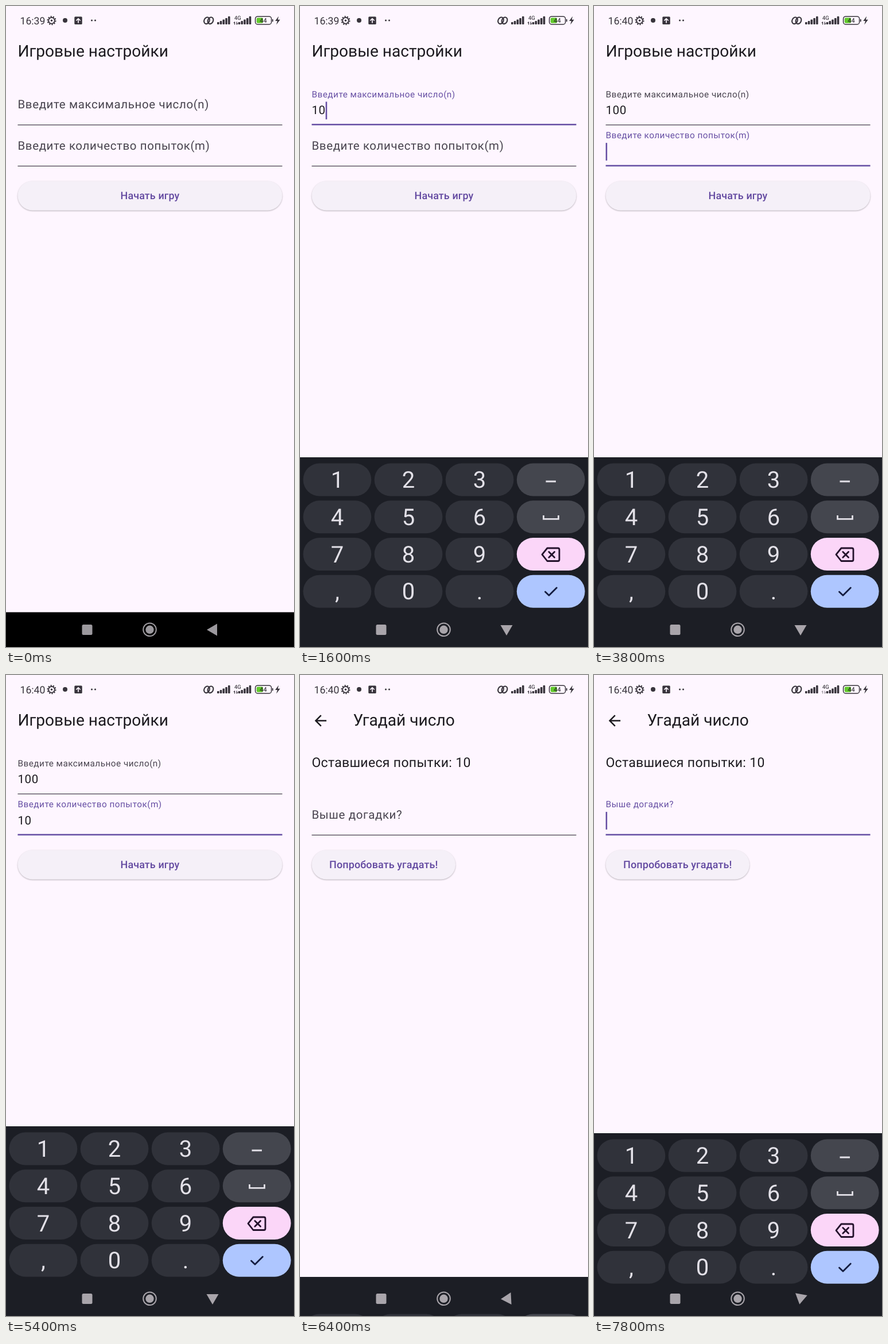
An HTML page for the animation above (8 s loop, 502 px wide and 1115 px high).

```html
<!DOCTYPE html>
<html lang="ru">
<head>
<meta charset="utf-8">
<title>Угадай число</title>
<style>
  html, body { margin: 0; width: 100%; height: 100%; overflow: hidden; background: #fef6ff; }
  svg { display: block; width: 502px; height: 1115px; }
  text { font-family: Roboto, "Noto Sans", sans-serif; fill: #1d1b20; text-rendering: geometricPrecision; white-space: pre; }
  .title { font-size: 28.1px; }
  .info { font-size: 23px; letter-spacing: .32px; }
  .label, .value { font-size: 20.45px; letter-spacing: .64px; }
  .label { fill: #49454f; }
  .line { fill: #49454f; }
  .focus .label, .focus .line, .caret { fill: #6750a4; }
  .button rect { fill: #f5f0f8; filter: drop-shadow(0 1.3px 1px rgba(0, 0, 0, .28)); }
  .button.pressed rect { fill: #e9e0f3; }
  .button text { fill: #6248a0; font-size: 17.9px; font-weight: 500; letter-spacing: .13px; text-anchor: middle; }
  .clock { font-size: 17.6px; fill: #38343c; }
  .digit { font-size: 40px; fill: #e3e1e8; text-anchor: middle; }
  .stroke { fill: none; stroke-linecap: round; stroke-linejoin: round; }
</style>
</head>
<body>
<svg id="stage" viewBox="0 0 502 1115" xmlns="http://www.w3.org/2000/svg"></svg>
<script>
const LOOP = 8000;
const LEFT = 20.45;
const DIGIT_WIDTH = 12.1;
const ROW = 71.6;
const INK = '#38343c';

const rect = (x, y, w, h, fill, r = 0, extra = '') =>
  `<rect x="${x}" y="${y}" width="${w}" height="${h}" rx="${r}" fill="${fill}" ${extra}/>`;
const label = (cls, x, y, s) => `<text class="${cls}" x="${x}" y="${y}">${s}</text>`;
const path = (d, color, width) =>
  `<path class="stroke" d="${d}" stroke="${color}" stroke-width="${width}"/>`;

function field(id, y, caption) {
  return `<g id="${id}" transform="translate(0 ${y})">
    <text class="label">${caption}</text>
    <text class="value" x="${LEFT}" y="188.3"></text>
    <rect class="line" x="${LEFT}" width="461.1"/>
    <rect class="caret" y="166.5" width="2.56" height="30.7"/>
  </g>`;
}

function button(id, width, caption) {
  return `<g id="${id}" class="button">
    <rect x="${LEFT}" y="304.5" width="${width}" height="51" rx="25.5"/>
    ${label('', LEFT + width / 2, 336.3, caption)}
  </g>`;
}

function signal(x) {
  return [4, 6, 8.5, 11, 14].map((h, i) => rect(x + i * 4.75, 32 - h, 3.6, h, INK, 1)).join('');
}

function statusBar() {
  return `<text id="clock" class="clock" x="24.5" y="31.7"></text>
    <circle cx="79.5" cy="25.3" r="5.3" fill="none" stroke="${INK}" stroke-width="1.8"/>
    <circle cx="79.5" cy="25.3" r="7" fill="none" stroke="${INK}" stroke-width="2" stroke-dasharray="2.2 2.2"/>
    <circle cx="79.5" cy="25.3" r="1.7" fill="${INK}"/>
    <circle cx="103" cy="25" r="4" fill="${INK}"/>
    ${rect(119.3, 18.5, 13.4, 13.4, INK, 1.5)}
    ${path('M126 29V22M122.8 25L126 21.8L129.2 25', '#fef6ff', 1.7)}
    <circle cx="149.5" cy="25" r="1.5" fill="${INK}"/><circle cx="155.5" cy="25" r="1.5" fill="${INK}"/>
    <g fill="none" stroke="${INK}" stroke-width="2.1">
      <ellipse cx="350" cy="25.3" rx="4.6" ry="6" transform="rotate(25 350 25.3)"/>
      <ellipse cx="356.5" cy="25.3" rx="4.6" ry="6" transform="rotate(25 356.5 25.3)"/>
    </g>
    ${signal(368)}
    <text x="398" y="24.3" font-size="9.5">4G</text>
    <g id="traffic">${path('M398.6 32V27.8L397.2 29.2M402.2 27.8V32L403.6 30.6', INK, 1.2)}</g>
    ${signal(404.7)}
    ${rect(434.6, 18.2, 28, 13.8, 'none', 4, `stroke="${INK}" stroke-width="1.5"`)}
    ${rect(436.8, 20.4, 11.2, 9.4, '#62c92c', 2)}
    ${rect(463.9, 22.8, 1.8, 4.6, INK, .9)}
    <text x="448.4" y="29.1" font-size="11" text-anchor="middle">44</text>
    <path d="M475.2 17.8L469.2 26H473L471.2 32.6L477.8 23.8H473.8Z" fill="${INK}"/>`;
}

function keyboard() {
  const faces = ['123', '456', '789', ',0.'];
  const sideFill = ['#44464e', '#44464e', '#fbd6f8', '#aec6ff'];
  let out = rect(0, 785, 502, 330, '#1c1e25');
  faces.forEach((row, r) => {
    const y = 795.5 + r * 64.75;
    [...row].forEach((c, i) => {
      const x = 5.5 + i * 124.1;
      out += rect(x, y, 118.8, 57, '#30323a', 28.5) + label('digit', x + 59.4, y + 42.6, c);
    });
    out += rect(377.8, y, 118.8, 57, sideFill[r], 28.5, r === 3 ? 'id="enter"' : '');
  });
  return out
    + rect(428.5, 825.5, 17.5, 3, '#e3e1e8')
    + '<path d="M424.5 886V892.3H450.5V886" fill="none" stroke="#e3e1e8" stroke-width="2.8"/>'
    + path('M431 943H449.5Q452 943 452 945.5V963Q452 965.5 449.5 965.5H431L422 954.2Z', '#24122c', 2.8)
    + path('M433.8 949.4L443.6 959.2M443.6 949.4L433.8 959.2', '#24122c', 2.8)
    + path('M427.5 1019L434 1025.2L447.3 1012', '#141c40', 2.8);
}

document.getElementById('stage').innerHTML = `
  ${rect(0, 0, 502, 1115, '#fef6ff')}
  ${statusBar()}
  <g id="settings">
    ${label('title', LEFT, 88, 'Игровые настройки')}
    ${field('max', 0, 'Введите максимальное число(n)')}
    ${field('tries', ROW, 'Введите количество попыток(m)')}
    ${button('start', 461.1, 'Начать игру')}
  </g>
  <g id="game">
    <path transform="translate(20.5 64.2) scale(1.278)" fill="#1d1b20"
      d="M20 11H7.8L13.4 5.4L12 4L4 12L12 20L13.4 18.6L7.8 13H20Z"/>
    ${label('title', 92.5, 88, 'Угадай число')}
    ${label('info', LEFT, 160, 'Оставшиеся попытки: 10')}
    ${field('guess', ROW, 'Выше догадки?')}
    ${button('try', 250.6, 'Попробовать угадать!')}
  </g>
  <rect id="bar" width="502" height="70"/>
  <g id="keys">${keyboard()}</g>
  <g id="nav">
    <rect x="132.5" y="1076" width="18" height="18" rx="2.5"/>
    <circle cx="250.5" cy="1084.8" r="7.2"/>
    <circle id="ring" cx="250.5" cy="1084.8" r="11.3" fill="none" stroke-width="2"/>
    <path id="back" d="M350 1085L368 1074.5V1095.5Z"/>
  </g>`;

const start = {
  clock: '16:39', page: 'settings', focus: '', caret: false, pressed: false, entered: false,
  max: '', tries: '', guess: '', maxLift: 0, triesLift: 0, guessLift: 0,
  keys: null, dark: false, turn: 0, traffic: 1
};

// Each step changes only the listed parts of the state.
const steps = [
  [200, { focus: 'max', caret: true, maxLift: .5 }],
  [400, { maxLift: 1, keys: 200, dark: true, turn: 25 }],
  [600, { keys: 4, turn: 83 }],
  [800, { keys: 0, turn: 90 }],
  [1000, { caret: false }],
  [1400, { caret: true, max: '1' }],
  [1600, { max: '10' }],
  [1800, { max: '100' }],
  [2000, { entered: true }],
  [2200, { entered: false, caret: false }],
  [2600, { focus: 'tries', caret: true, triesLift: .868 }],
  [2800, { triesLift: 1 }],
  [3200, { caret: false }],
  [3600, { caret: true }],
  [3800, { clock: '16:40' }],
  [4200, { caret: false }],
  [4600, { caret: true }],
  [4800, { tries: '1' }],
  [5000, { tries: '10' }],
  [5400, { caret: false }],
  [6200, { pressed: true }],
  [6400, { page: 'game', focus: '', pressed: false, keys: 316, turn: 3 }],
  [6600, { keys: null, dark: false, turn: 0 }],
  [7600, { focus: 'guess', caret: true, guessLift: 1, turn: 8, traffic: .5 }],
  [7800, { keys: 12, dark: true, turn: 80 }]
];

const el = id => document.getElementById(id);
const set = (node, attrs) => Object.entries(attrs).forEach(([k, v]) => node.setAttribute(k, v));
const show = (node, on) => set(node, { visibility: on ? 'visible' : 'hidden' });

function drawField(id, s) {
  const group = el(id), lift = s[id + 'Lift'], focused = s.focus === id;
  const thick = focused ? 2.56 : 1.28;
  const part = cls => group.querySelector('.' + cls);
  group.classList.toggle('focus', focused);
  set(part('label'), { transform: `translate(${LEFT} ${178 - 19.4 * lift}) scale(${1 - .25 * lift})` });
  part('value').textContent = s[id];
  set(part('line'), { y: 207.5 - thick, height: thick });
  set(part('caret'), {
    x: LEFT + s[id].length * DIGIT_WIDTH,
    opacity: focused && s.caret ? 1 : 0
  });
}

function draw(s) {
  el('clock').textContent = s.clock;
  set(el('traffic'), { opacity: s.traffic });
  show(el('settings'), s.page === 'settings');
  show(el('game'), s.page === 'game');
  ['max', 'tries', 'guess'].forEach(id => drawField(id, s));
  el('start').classList.toggle('pressed', s.pressed);
  set(el('enter'), { fill: s.entered ? '#9bb1e6' : '#aec6ff' });
  show(el('keys'), s.keys !== null);
  set(el('keys'), { transform: `translate(0 ${s.keys || 0})` });
  set(el('bar'), { y: s.dark ? 1047 : 1054.5, fill: s.dark ? '#1c1e25' : '#000' });
  const tint = s.dark ? '#a9a5ab' : '#9c999e';
  set(el('nav'), { fill: tint });
  set(el('ring'), { stroke: tint });
  set(el('back'), { transform: `rotate(${-s.turn} 360 1085)` });
}

let shown = -1;
const origin = performance.now();
function tick() {
  const t = (performance.now() - origin) % LOOP;
  const past = steps.filter(([at]) => at <= t);
  if (past.length !== shown) {
    shown = past.length;
    draw(Object.assign({}, start, ...past.map(([, change]) => change)));
  }
  requestAnimationFrame(tick);
}
tick();
</script>
</body>
</html>
```
